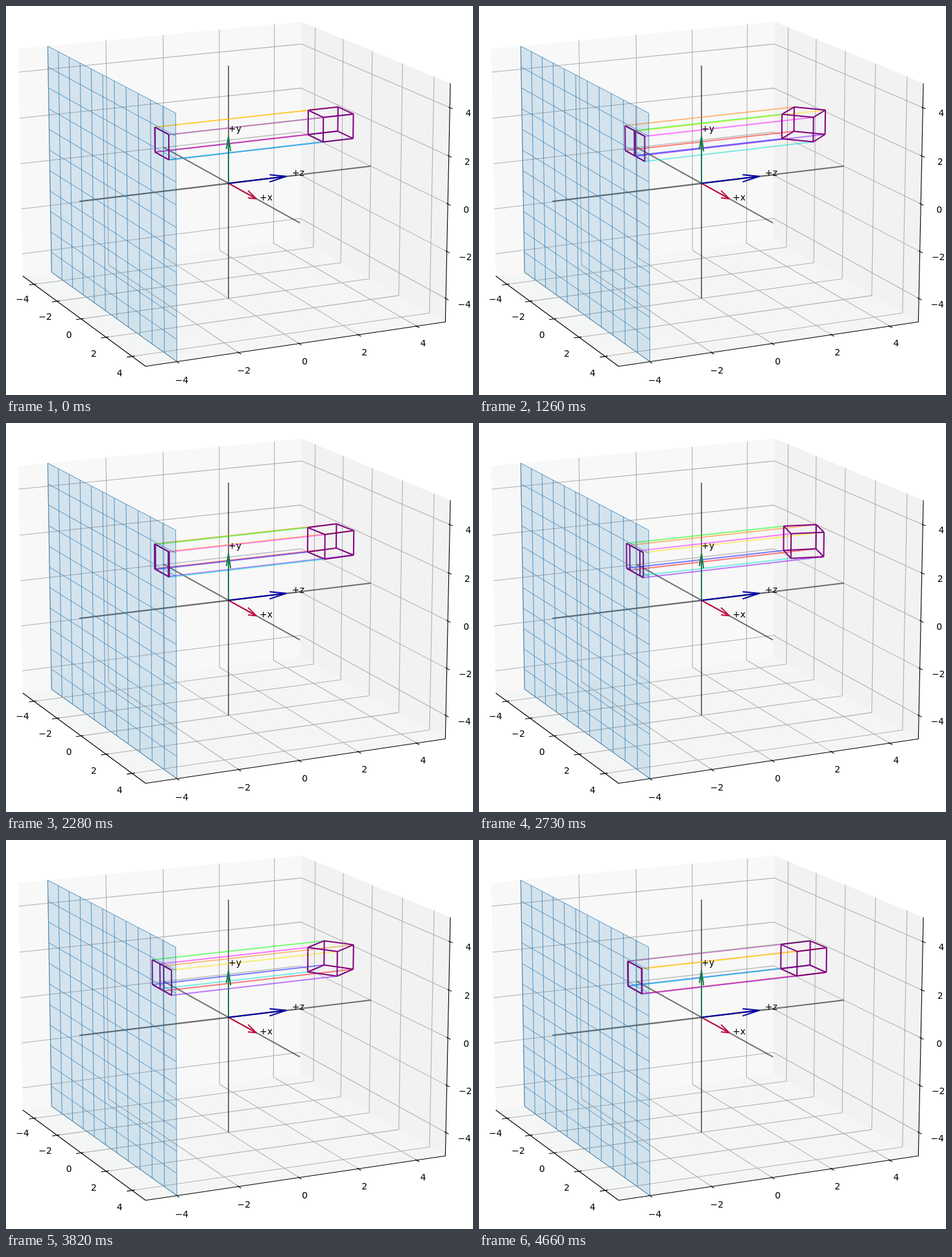
These frames come from a looping animation (720x600 px, 4700 ms). An HTML page with a canvas:

```html
<!DOCTYPE html>
<html lang="en">
<head>
<meta charset="utf-8">
<title>Orthographic projection of a turning cube</title>
<style>
html, body { margin: 0; width: 100%; height: 100%; overflow: hidden; background: #fff; }
canvas { display: block; }
</style>
</head>
<body>
<canvas id="stage" width="720" height="600"></canvas>
<script>
const ctx = document.getElementById('stage').getContext('2d');
const LOOP = 4700, PLANE_Z = -4, RAD = Math.PI / 180;
const TICKS = [-4, -2, 0, 2, 4];

// Perspective camera: azimuth 25°, elevation 15°, distance 10, box aspect 4:3:4.
const sa = Math.sin(25 * RAD), ca = Math.cos(25 * RAD);
const se = Math.sin(15 * RAD), ce = Math.cos(15 * RAD);
function project([x, y, z]) {
  const X = x * 0.11428, Y = y * 0.08571, Z = z * 0.11428;
  const depth = Z * sa - X * ca;
  const k = 433.5 / (1 + (depth * ce - Y * se) / 10);
  return [343 + k * (X * sa + Z * ca), 273.5 - k * (Y * ce + depth * se)];
}

function path(points) {
  ctx.beginPath();
  points.forEach(p => ctx.lineTo(...project(p)));
}
function line(points, color, width) {
  path(points);
  ctx.strokeStyle = color;
  ctx.lineWidth = width;
  ctx.stroke();
}
function fill(points, color) {
  path(points);
  ctx.closePath();
  ctx.fillStyle = color;
  ctx.fill();
}
function label(text, x, y, align) {
  ctx.textAlign = align;
  ctx.fillStyle = '#000';
  ctx.fillText(text, x, y + 5);
}

function drawBox() {
  fill([[-5, 5, -5], [-5, 5, 5], [-5, -5, 5], [-5, -5, -5]], '#f8f8f8');
  fill([[-5, 5, 5], [5, 5, 5], [5, -5, 5], [-5, -5, 5]], '#f2f2f2');
  fill([[-5, -5, -5], [-5, -5, 5], [5, -5, 5], [5, -5, -5]], '#f4f6f5');
  const grid = '#b0b0b0';
  for (const t of TICKS) {
    line([[t, 5, 5], [t, -5, 5], [t, -5, -5]], grid, 1.1);
    line([[-5, t, -5], [-5, t, 5], [5, t, 5]], grid, 1.1);
    line([[-5, 5, t], [-5, -5, t], [5, -5, t]], grid, 1.1);
  }
  line([[-5, -5, -5], [5, -5, -5], [5, -5, 5], [5, 5, 5]], '#000', 1.1);
  for (const t of TICKS) {
    line([[t, -5, -5.167], [t, -5, -4.917]], '#000', 1.1);
    line([[5.167, -5, t], [4.917, -5, t]], '#000', 1.1);
    line([[5.167, t, 5], [4.917, t, 5]], '#000', 1.1);
    const text = String(t).replace('-', '\u2212');
    const put = (p, dx, dy) => {
      const [u, v] = project(p);
      label(text, u + dx, v + dy, 'center');
    };
    put([t, -5, -5], -18.5 - t * 0.2, 24 + t * 0.3);
    put([5, -5, t], 8.7 + t * 0.3, 27 - t * 0.25);
    put([5, t, 5], 28.5, 8.3);
  }
}

function drawAxes() {
  const gray = 'rgba(0,0,0,0.54)';
  line([[-5, 0, 0], [5, 0, 0]], gray, 2);
  line([[0, -5, 0], [0, 5, 0]], gray, 2);
  line([[0, 0, -5], [0, 0, 5]], gray, 2);
}

function drawPlane() {
  const n = 11, z = PLANE_Z;
  fill([[-5, 5, z], [5, 5, z], [5, -5, z], [-5, -5, z]], 'rgba(31,119,180,0.16)');
  for (let i = 0; i <= n; i++) {
    const t = -5 + 10 * i / n;
    line([[t, -5, z], [t, 5, z]], 'rgba(31,119,180,0.8)', 0.9);
    line([[-5, t, z], [5, t, z]], 'rgba(31,119,180,0.8)', 0.9);
  }
}

function arrow(tip, heads, color) {
  line([[0, 0, 0], tip], color, 2);
  line([heads[0], tip, heads[1]], color, 2);
}
function drawArrows() {
  const back = 2 - 0.6 * Math.cos(15 * RAD), side = 0.6 * Math.sin(15 * RAD);
  arrow([2, 0, 0], [[back, side, 0], [back, -side, 0]], '#c4083f');
  arrow([0, 2, 0], [[side, back, 0], [-side, back, 0]], '#1a7a4c');
  arrow([0, 0, 2], [[0, side, back], [0, -side, back]], '#0000a0');
  label('+x', 391, 295, 'left');
  label('+y', 343, 189, 'left');
  label('+z', 441, 257, 'left');
}

// Corner offsets with the ray colours of their bottom and top vertex.
const CORNERS = [
  [-0.5, -0.5, '255,0,0', '255,128,0'],
  [-0.5, 0.5, '128,0,255', '255,225,0'],
  [0.5, -0.5, '0,0,255', '0,255,0'],
  [0.5, 0.5, '0,224,208', '255,0,255']
];
const RING = [0, 1, 3, 2];

function drawCube(angle) {
  const c = Math.cos(angle), s = Math.sin(angle);
  const spots = CORNERS.map(([x, z]) => [4 + x * c - z * s, 1.5 + x * s + z * c]);
  spots.forEach(([x, z], i) => [3, 4].forEach((y, j) =>
    line([[x, y, z], [x, y, PLANE_Z]], `rgba(${CORNERS[i][2 + j]},0.5)`, 2)));
  for (const flat of [false, true]) {
    const at = (i, y) => [spots[i][0], y, flat ? PLANE_Z : spots[i][1]];
    RING.forEach((a, k) => {
      const b = RING[(k + 1) % 4];
      line([at(a, 3), at(b, 3)], '#800080', 2);
      line([at(a, 4), at(b, 4)], '#800080', 2);
      line([at(a, 3), at(a, 4)], '#800080', 2);
    });
  }
}

// Four 2° steps every 210 ms: three short holds, then one of 100 ms.
function stepAt(ms) {
  const t = ms + 30, r = t % 210;
  return 4 * Math.floor(t / 210) - 1 + (r >= 30) + (r >= 70) + (r >= 110);
}

function draw(ms) {
  ctx.fillStyle = '#fff';
  ctx.fillRect(0, 0, 720, 600);
  ctx.font = '13.89px "DejaVu Sans", sans-serif';
  ctx.lineJoin = 'round';
  drawBox();
  drawAxes();
  drawCube(-2 * stepAt(ms) * RAD);
  drawPlane();
  drawArrows();
}

const start = performance.now();
function tick() {
  draw((performance.now() - start) % LOOP);
  requestAnimationFrame(tick);
}
tick();
</script>
</body>
</html>
```
